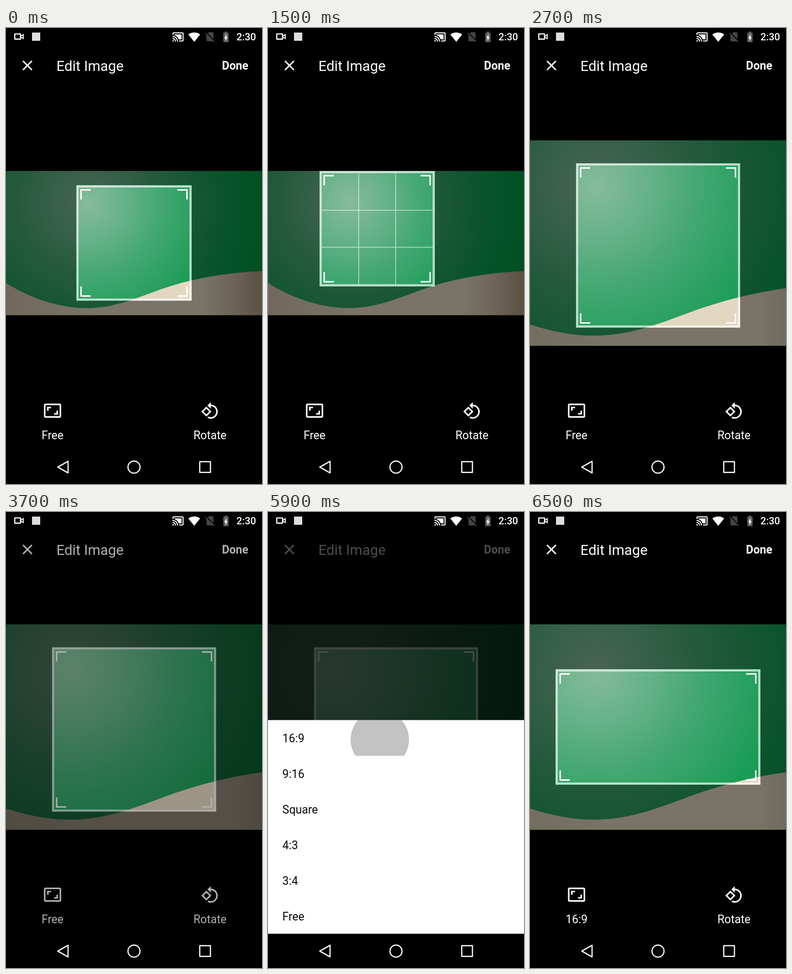
These frames come from a looping animation (561 px wide and 998 px high, 8 s). An HTML page:

```html
<!DOCTYPE html>
<html lang="en">
<head>
<meta charset="utf-8">
<title>Edit Image</title>
<style>
  html, body { margin: 0; width: 100%; height: 100%; overflow: hidden; background: #000; }
  svg { display: block; width: 561px; height: 998px; font-family: Roboto, sans-serif; }
  .label { font-size: 24.93px; }
  .mid { text-anchor: middle; }
  .white { fill: #fff; }
  .line { fill: none; stroke: #f6f6f6; stroke-width: 2.7; stroke-linejoin: round; }
</style>
</head>
<body>
<svg viewBox="0 0 561 998">
  <defs>
    <radialGradient id="green" gradientUnits="userSpaceOnUse" cx="180" cy="383" r="430">
      <stop offset="0" stop-color="#86bb9a"/>
      <stop offset=".19" stop-color="#66b288"/>
      <stop offset=".37" stop-color="#43a772"/>
      <stop offset=".6" stop-color="#219e5a"/>
      <stop offset=".84" stop-color="#009945"/>
      <stop offset="1" stop-color="#099046"/>
    </radialGradient>
    <linearGradient id="sand" gradientUnits="userSpaceOnUse" x1="0" y1="0" x2="561" y2="0">
      <stop offset="0" stop-color="#d2c3ad"/>
      <stop offset=".35" stop-color="#e2d8c0"/>
      <stop offset=".77" stop-color="#e2d8c0"/>
      <stop offset=".89" stop-color="#c9baa1"/>
      <stop offset="1" stop-color="#a8977e"/>
    </linearGradient>
    <clipPath id="row"><rect y="455.4" width="561" height="78"/></clipPath>
  </defs>
  <rect width="561" height="998"/>

  <g id="photo">
    <rect y="312.8" width="561" height="315.7" fill="url(#green)"/>
    <path fill="url(#sand)" d="M0 558C50 590 115 613 178 613C240 613 290 589 345 570C415 546 490 535 561 532V628.5H0z"/>
  </g>
  <path id="shade" fill="#000" fill-opacity=".467" fill-rule="evenodd"/>
  <path id="grid" fill="none" stroke="#fff" stroke-opacity=".667" stroke-width="1.56"/>
  <rect id="border" fill="none" stroke="#fff" stroke-opacity=".667" stroke-width="4.67"/>
  <path id="corners" fill="none" stroke="#fff" stroke-width="3.12"/>

  <g class="white">
    <g id="tools"></g>
    <text x="110.5" y="94" font-size="31.16">Edit Image</text>
    <text x="531" y="91" class="label" font-weight="700" text-anchor="end">Done</text>
    <text id="ratio" x="102" y="900" class="label mid"></text>
    <text x="447" y="900" class="label mid">Rotate</text>
  </g>

  <rect id="dim" y="38" width="561" height="885" fill="#000"/>
  <g id="sheet">
    <rect y="455.4" width="561" height="468" fill="#fefffe"/>
    <circle id="ripple" cx="245" cy="498" clip-path="url(#row)"/>
    <g id="options" class="label" fill="#0a0a0a"></g>
  </g>

  <rect y="923" width="561" height="75"/>
  <path class="line" d="M113.5 961L136 948.3V973.7z"/>
  <circle class="line" cx="280.5" cy="961" r="13.2"/>
  <rect class="line" x="424.6" y="949.2" width="23.4" height="23.4"/>

  <g id="status"></g>
  <rect x="19.2" y="13" width="12.6" height="11.4" class="line" stroke-width="2.2"/>
  <path class="white" d="M31 17.5L38.8 12.5V25L31 20z"/>
  <path d="M33.5 18.3L36.6 16.2V21.3L33.5 19.2z"/>
  <rect x="57" y="10" width="18" height="18" fill="#dedede"/>
  <text x="505" y="27" font-size="21.8" font-weight="500" class="white">2:30</text>
</svg>
<script>
const $ = id => document.getElementById(id);
const DP = 561 / 360, LOOP = 8000, STEP = 100;

// 24-unit icon centred at (x, y)
const icon = (x, y, size, d, fill = '#fff') =>
  `<path fill="${fill}" transform="translate(${x - size / 2} ${y - size / 2}) scale(${size / 24})" d="${d}"/>`;

$('tools').innerHTML =
  icon(47, 82, 37.4, 'M19 6.41L17.59 5 12 10.59 6.41 5 5 6.41 10.59 12 5 17.59 6.41 19 12 13.41 17.59 19 19 17.59 13.41 12z') +
  icon(102, 837.5, 41.2, 'M19 12h-2v3h-3v2h5v-5zM7 9h3V7H5v5h2V9zm14-6H3c-1.1 0-2 .9-2 2v14c0 1.1.9 2 2 2h18c1.1 0 2-.9 2-2V5c0-1.1-.9-2-2-2zm0 16.01H3V4.99h18v14.02z') +
  icon(447, 838, 41, 'M7.34 6.41L.86 12.9l6.49 6.48 6.49-6.48-6.5-6.49zM3.69 12.9l3.66-3.66L11 12.9l-3.66 3.66-3.65-3.66zm15.67-6.26C17.61 4.88 15.3 4 13 4V.76L8.76 5 13 9.24V6c1.79 0 3.58.68 4.95 2.05 2.73 2.73 2.73 7.17 0 9.9C16.58 19.32 14.79 20 13 20c-.97 0-1.94-.21-2.84-.61l-1.49 1.49C10.02 21.62 11.51 22 13 22c2.3 0 4.61-.88 6.36-2.64 3.52-3.51 3.52-9.21 0-12.72z');

$('status').innerHTML =
  icon(377, 19.5, 26.5, 'M21 3H3c-1.1 0-2 .9-2 2v3h2V5h18v14h-7v2h7c1.1 0 2-.9 2-2V5c0-1.1-.9-2-2-2zM1 18v3h3c0-1.66-1.34-3-3-3zm0-4v2c2.76 0 5 2.24 5 5h2c0-3.87-3.13-7-7-7zm0-4v2c4.97 0 9 4.03 9 9h2c0-6.08-4.93-11-11-11zM19 7H5v1.63c3.96 1.28 7.09 4.41 8.37 8.37H19V7z') +
  icon(412.5, 19.8, 26.5, 'M12.01 21.49L23.64 7c-.45-.34-4.93-4-11.64-4C5.28 3 .81 6.66.36 7l11.63 14.49z') +
  icon(447, 19.3, 26.5, 'M18.99 5c0-1.1-.89-2-1.99-2h-7L7.66 5.34 19 16.68 18.99 5zM3.65 3.88L2.38 5.15 5 7.77V19c0 1.1.9 2 2 2h10.01c.35 0 .67-.1.96-.26l1.88 1.88 1.27-1.27L3.65 3.88z', '#454545') +
  icon(482, 19.4, 27.8, 'M15.67 4H14V2h-4v2H8.33C7.6 4 7 4.6 7 5.33v15.33C7 21.4 7.6 22 8.33 22h7.33c.74 0 1.34-.6 1.34-1.33V5.33C17 4.6 16.4 4 15.67 4z', '#626262') +
  icon(482, 19.4, 27.8, 'M11 20v-5.5H9L13 7v5.5h2L11 20z');

$('options').innerHTML = ['16:9', '9:16', 'Square', '4:3', '3:4', 'Free']
  .map((name, i) => `<text x="31.6" y="${504 + 78 * i}">${name}</text>`).join('');

const ease = (t, start, length) => {
  const k = Math.min(1, Math.max(0, (t - start) / length));
  return k * k * (3 - 2 * k);
};
const mix = (a, b, k) => a + (b - a) * k;

// time, left, top of the dragged crop window
const drag = [
  [900, 154.3, 344.3], [1500, 113, 313], [1700, 112, 313], [2250, 149.6, 348.3]
];
const SIDE = 252.45, ZOOM = 1.424;

function cropAt(t, zoom) {
  if (t >= 6100) return [56.1, 344.3, 448.8, 252.45];
  let [, x, y] = drag[0];
  for (let i = 1; i < drag.length; i++) {
    const [from] = drag[i - 1], [to, nx, ny] = drag[i];
    const k = ease(t, from, to - from);
    x = mix(x, nx, k);
    y = mix(y, ny, k);
  }
  const side = mix(SIDE, SIDE * ZOOM, zoom);
  return [mix(x, 100.9, zoom), mix(y, 296.2, zoom), side, side];
}

function drawCrop([x, y, w, h], dragging) {
  const r = x + w, b = y + h;
  $('shade').setAttribute('d', `M0 38H561V923H0zM${x} ${y}H${r}V${b}H${x}z`);

  const line = 3 * DP;
  const set = (name, value) => $('border').setAttribute(name, value);
  set('x', x + line / 2);
  set('y', y + line / 2);
  set('width', w - line);
  set('height', h - line);

  const near = 6.5 * DP, far = 20 * DP;
  const corner = (cx, cy, sx, sy) =>
    `M${cx + sx * near} ${cy + sy * far}V${cy + sy * near}H${cx + sx * far}` +
    `M${cx + sx * near} ${cy + sy * near}h${-sx * DP}m${sx * DP} 0v${-sy * DP}`;
  $('corners').setAttribute('d',
    corner(x, y, 1, 1) + corner(r, y, -1, 1) + corner(x, b, 1, -1) + corner(r, b, -1, -1));

  const gx = (w - 2 * line) / 3, gy = (h - 2 * line) / 3;
  $('grid').setAttribute('d', !dragging ? '' : [1, 2].map(i =>
    `M${x + line + gx * i} ${y + line}V${b - line}M${x + line} ${y + line + gy * i}H${r - line}`).join(''));
}

function draw(t) {
  const zoom = ease(t, 2300, 300);
  const scale = mix(1, ZOOM, zoom);
  $('photo').setAttribute('transform',
    `translate(${-112 * zoom} ${470.65 * (1 - scale)}) scale(${scale})`);
  drawCrop(cropAt(t, zoom), t >= 900 && t < 2300);
  $('ratio').textContent = t < 6100 ? 'Free' : '16:9';

  const open = ease(t, 3470, 500) - ease(t, 6030, 400);
  $('dim').setAttribute('opacity', 0.7 * open);
  $('sheet').setAttribute('transform', `translate(0 ${923 * (1 - open)})`);

  const press = t - 5900;
  $('ripple').setAttribute('r', press < 0 ? 0 : 64 + press * 1.1);
  $('ripple').setAttribute('fill-opacity', Math.max(0, 0.24 - press * 0.0008));
}

const start = performance.now();
function tick() {
  const t = (performance.now() - start) % LOOP;
  draw(Math.floor(t / STEP) * STEP);
  requestAnimationFrame(tick);
}
tick();
</script>
</body>
</html>
```
